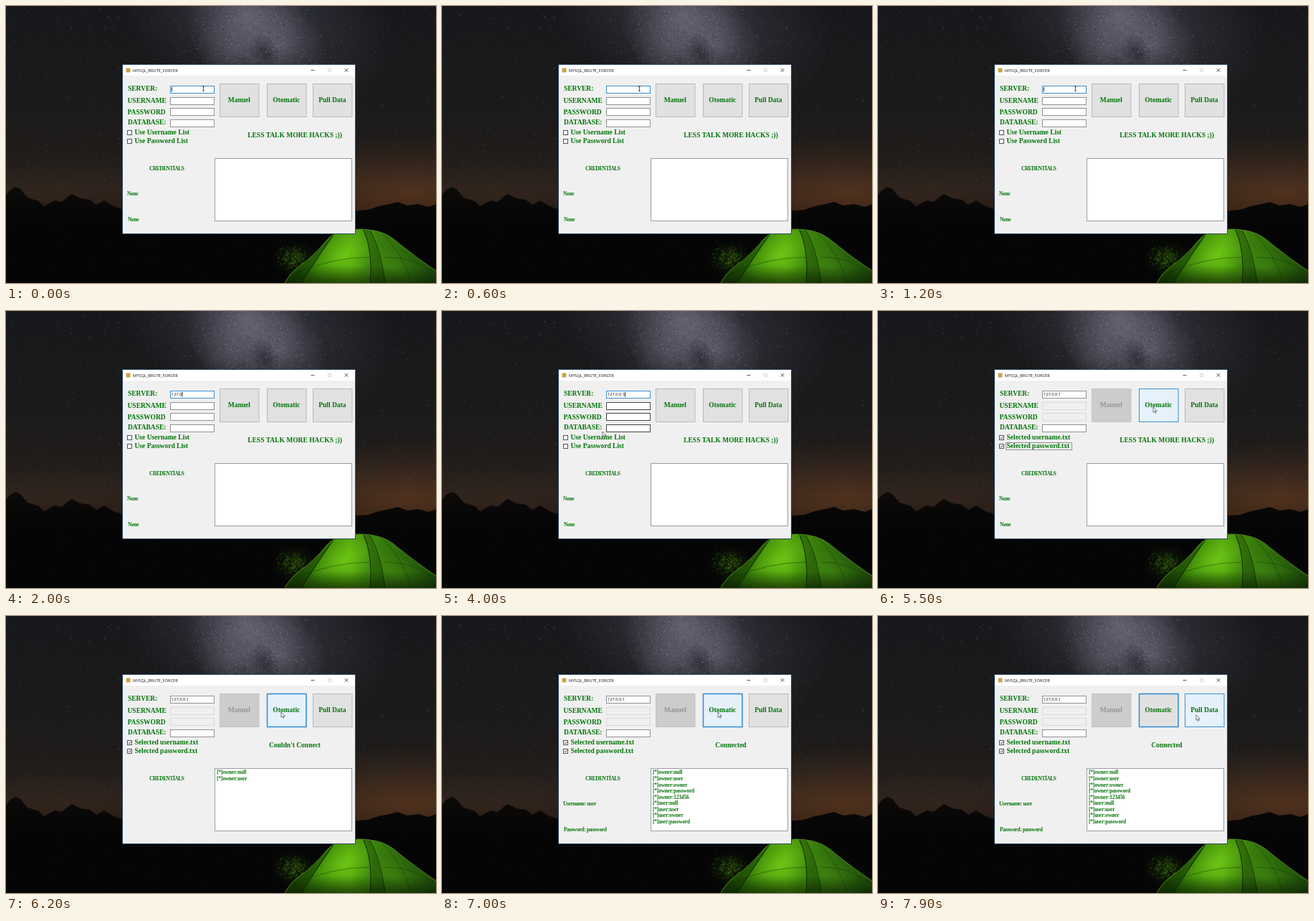
These frames come from a looping animation (600x386 px, 8000 ms). An HTML page with a canvas:

```html
<!DOCTYPE html>
<html lang="en">
<head>
<meta charset="utf-8">
<title>Login form</title>
<style>
html, body { margin: 0; width: 100%; height: 100%; overflow: hidden; background: #0c0d0f; }
canvas, svg { position: absolute; left: 0; top: 0; width: 600px; height: 386px; }
text { white-space: pre; }
.b { font: bold 9.5px "Liberation Serif", serif; fill: #05750a; }
.s, .l { font: bold 7.4px "Liberation Serif", serif; fill: #05750a; letter-spacing: -0.28px; }
.l { letter-spacing: -0.16px; }
.u { font: 5.7px "Open Sans", sans-serif; fill: #111; }
.m { text-anchor: middle; }
</style>
</head>
<body>
<canvas id="sky" width="600" height="386"></canvas>
<svg id="ui" viewBox="0 0 600 386"></svg>
<script>
const LOOP = 8000;

// ---------- night scene, painted once ----------
const c = document.getElementById('sky').getContext('2d');
let seed = 7;
const rnd = () => (seed = (seed * 16807) % 2147483647) / 2147483647;
const bell = () => rnd() + rnd() + rnd() - 1.5;

function fade(g, stops) {
  stops.forEach(([p, col]) => g.addColorStop(p, col));
  return g;
}
function glow(x, y, rx, ry, turn, rgb, a) {
  c.save();
  c.translate(x, y);
  c.rotate(turn);
  c.scale(rx, ry);
  c.fillStyle = fade(c.createRadialGradient(0, 0, 0, 0, 0, 1),
    [[0, `rgba(${rgb},${a})`], [0.5, `rgba(${rgb},${a * 0.45})`], [1, `rgba(${rgb},0)`]]);
  c.fillRect(-1, -1, 2, 2);
  c.restore();
}
function shape(d, fill, stroke, w) {
  const p = new Path2D(d);
  if (fill) { c.fillStyle = fill; c.fill(p); }
  if (stroke) { c.strokeStyle = stroke; c.lineWidth = w; c.stroke(p); }
}
function speck(x, y, size, col) {
  c.fillStyle = col;
  c.fillRect(x, y, size, size);
}

function paintScene() {
  c.fillStyle = fade(c.createLinearGradient(0, 0, 0, 290),
    [[0, '#17181b'], [0.4, '#1a1a1b'], [0.7, '#1f1c1a'], [0.88, '#2a211c'], [1, '#261a14']]);
  c.fillRect(0, 0, 600, 386);
  glow(565, 262, 250, 80, 0, '125,70,32', 0.45);
  glow(70, 262, 180, 45, 0, '75,50,36', 0.25);
  glow(350, 15, 200, 125, 0.3, '92,92,112', 0.5);
  glow(335, 15, 85, 85, -0.3, '150,147,168', 0.45);
  glow(385, 55, 65, 55, 0.5, '145,142,165', 0.35);
  glow(315, 60, 50, 50, 0, '130,127,148', 0.28);
  glow(361, 66, 20, 30, -0.5, '30,29,38', 0.6);

  for (let i = 0; i < 3000; i++) {
    const y = rnd() * 95, x = 338 + y * 0.25 + bell() * 100;
    speck(x, y, 0.6 + rnd() * 0.7, rnd() < 0.6 ? `rgba(205,205,225,${rnd() * 0.3})` : `rgba(18,18,27,${rnd() * 0.3})`);
  }
  for (let i = 0; i < 2600; i++)
    speck(rnd() * 600, rnd() * 245, 0.5 + rnd() * 0.6, `rgba(190,192,205,${rnd() * 0.28})`);
  for (let i = 0; i < 80; i++)
    speck(rnd() * 600, rnd() * 200, 1, `rgba(220,222,232,${0.15 + rnd() * 0.35})`);

  // ridges and ground
  shape('M0 263L6 256L13 252L20 255L30 267L46 272L53 279L68 271L78 273L86 266L92 262L104 268L117 270L126 277L137 271L150 279L170 286H480L505 284L520 279L535 276L547 273L560 278L575 276L590 280L600 276V386H0Z',
    fade(c.createLinearGradient(0, 255, 0, 300), [[0, '#0c0a09'], [1, '#050505']]));
  for (let i = 0; i < 300; i++)
    speck(rnd() * 600, 295 + rnd() * 90, 1.3, `rgba(30,29,22,${rnd() * 0.22})`);

  // bush beside the tent
  glow(402, 352, 32, 26, 0, '35,75,12', 0.4);
  for (let i = 0; i < 320; i++)
    speck(402 + bell() * 23, 351 + bell() * 18, 1 + rnd(), `rgba(${45 + rnd() * 45 | 0},${85 + rnd() * 55 | 0},20,${rnd() * 0.6})`);

  // tent
  const edge = 'M389 386Q397 371 410 362Q428 350 447 327Q455 317 470 313Q496 309 514 313Q527 315 540 324Q574 352 606 373';
  const body = edge + 'V386Z';
  c.save();
  c.clip(new Path2D(body));
  shape(body, fade(c.createLinearGradient(392, 0, 600, 0),
    [[0, '#1f4d05'], [0.2, '#388008'], [0.42, '#52a40c'], [0.6, '#3a800c'], [0.8, '#2c660c'], [1, '#1f4d0a']]));
  glow(472, 347, 52, 32, -0.5, '125,215,25', 0.65);
  glow(545, 368, 55, 26, 0.6, '80,155,25', 0.35);
  shape('M389 386Q403 367 440 335L459 316Q437 350 412 386Z', 'rgba(14,48,2,.45)');
  shape('M506 312Q520 335 529 386H508Q512 340 498 312Z', 'rgba(15,50,4,.35)');
  shape('M459 316Q434 350 412 386M507 312Q522 335 529 386M499 312Q512 340 508 386', null, 'rgba(15,48,3,.85)', 1.2);
  shape('M524 316Q552 342 566 386M402 373Q455 350 509 350M529 350Q565 349 600 373', null, 'rgba(18,55,6,.55)', 0.9);
  c.fillStyle = fade(c.createLinearGradient(0, 362, 0, 386), [[0, 'rgba(6,20,2,0)'], [1, 'rgba(6,20,2,.6)']]);
  c.fillRect(385, 362, 215, 24);
  c.restore();
  shape(edge, null, '#5f9c22', 0.8);
}
paintScene();

// ---------- window ----------
const ui = document.getElementById('ui');
function add(tag, attrs, text) {
  const e = document.createElementNS('http://www.w3.org/2000/svg', tag);
  set(e, attrs);
  if (text !== undefined) e.textContent = text;
  return ui.appendChild(e);
}
function set(e, attrs) {
  for (const k in attrs) e.setAttribute(k, attrs[k]);
}
const box = (x, y, width, height, fill, stroke = 'none') => add('rect', { x, y, width, height, fill, stroke });
const label = (x, y, cls, s) => add('text', { x, y, class: cls }, s);
const line = (d, stroke, w = 0.8) => add('path', { d, stroke, fill: 'none', 'stroke-width': w });
const show = (e, on) => e.setAttribute('visibility', on ? 'visible' : 'hidden');
const say = (e, s) => { if (e.textContent !== s) e.textContent = s; };

const BLUE = '#3a8fd4', GRAY = '#929292';

box(162.5, 81.5, 325, 236, '#f0f0f0', '#2b4a66');
box(163, 82, 324, 15, '#fff');
box(167.5, 86.5, 6, 6, '#c9a44a');
label(177, 91.8, 'u', 'MYSQL_BRUTE_FORCER');
line('M425.5 89.5H430.5', '#333');
line('M449.5 87.5H453.5V91.5H449.5Z', '#ccc');
line('M472.7 87.2L477.2 91.7M477.2 87.2L472.7 91.7', '#222');

[['SERVER:', 170, 118], ['USERNAME', 169.5, 135.3], ['PASSWORD', 169.5, 150.8], ['DATABASE:', 170, 165]]
  .forEach(([s, x, y]) => label(x, y, 'b', s));
const [server, userBox, passBox, dbBox] = [111.5, 127.5, 142.5, 158.5].map(y => box(229.5, y, 61, 10, '#fff', GRAY));
const typed = label(231, 118.4, 'u', '');
const caret = line('', '#000', 0.9);

const checks = [[173.5, 'username'], [185.5, 'password']].map(([y, word]) => ({
  word,
  frame: box(169.5, y, 6, 6, '#fff', '#555'),
  tick: line(`M170.8 ${y + 3.1}L172.2 ${y + 4.5}L174.6 ${y + 1.5}`, '#333', 0.9),
  text: label(179.5, y + 5.9, 'b', ''),
  focus: box(178.5, y - 2, 92, 10, 'none', GRAY)
}));

const [manual, auto, pull] = [[298, 'Manuel'], [364, 'Otomatic'], [428, 'Pull Data']].map(([x, s]) => ({
  rect: box(x + 0.5, 108.5, 54.5, 46, '#e1e1e1', '#b8b8b8'),
  text: label(x + 27.3, 134.3, 'b m', s)
}));
const status = label(403, 183, 'b m', '');

label(200, 229.4, 's', 'CREDENTİALS').style.letterSpacing = '-0.45px';
const cred1 = label(169, 263.5, 's', '');
const cred2 = label(170, 300.2, 's', '');
box(291.5, 212.5, 191, 87, '#fff', '#9a9da2');
const tries = ['owner:null', 'owner:user', 'owner:owner', 'owner:password', 'owner:123456',
  'user:null', 'user:user', 'user:owner', 'user:password'];
const rows = tries.map((s, i) => label(294, 220.4 + i * 8.55, 'l', '[*]' + s));

const beam = line('M274 112H277M275.5 112V118.3M274 118.3H277', '#222', 0.8);
const arrow = add('path', { d: 'M0 0V7.2L1.7 5.7L2.9 8.3L4 7.8L2.9 5.3H5.1Z', fill: '#fff', stroke: '#222', 'stroke-width': 0.6 });

// ---------- timeline ----------
const keys = [1500, 1600, 1700, 1900, 2000, 2800, 2900, 3000, 3300];
const path = [[3600, 275, 114], [4000, 224, 168], [4300, 213, 176], [4500, 213, 176], [4850, 226, 188],
  [5050, 226, 188], [5400, 384, 134], [6950, 384, 134], [7600, 444, 138]];
const PICK1 = 4400, PICK2 = 5000, RUN = 6000, DONE = 6900;

function pointer(t) {
  let i = path.findIndex(p => p[0] > t);
  if (i < 0) return path[path.length - 1].slice(1);
  if (i === 0) i = 1;
  const [t0, x0, y0] = path[i - 1], [t1, x1, y1] = path[i];
  const p = Math.max(0, (t - t0) / (t1 - t0)), e = p * p * (3 - 2 * p);
  return [x0 + (x1 - x0) * e, y0 + (y1 - y0) * e];
}

function field(e, off, lit) {
  set(e, { fill: off ? '#f0f0f0' : '#fff', stroke: off ? '#d8d8d8' : lit ? '#444' : GRAY });
}
function button(b, hover, focus, down) {
  set(b.rect, {
    fill: down ? '#cce4f7' : hover ? '#e5f1fb' : '#e1e1e1',
    stroke: hover || focus ? BLUE : '#b8b8b8',
    'stroke-width': focus ? 1.6 : 1
  });
}

function draw(t) {
  const [x, y] = pointer(t);
  const one = t >= PICK1, two = t >= PICK2, run = t >= RUN, done = t >= DONE;

  const n = keys.filter(k => k <= t).length;
  say(typed, '127.0.0.1'.slice(0, n));
  const blink = t >= keys[0] || Math.floor(t / 530) % 2 === 0;
  const cx = 231.3 + (n ? typed.getComputedTextLength() : 0);
  set(caret, { d: `M${cx} 113V119.5` });
  show(caret, !one && blink);
  server.setAttribute('stroke', one ? GRAY : BLUE);

  const swept = t >= 3800 && !one;
  field(userBox, one, swept);
  field(passBox, two, swept);
  field(dbBox, false, swept);

  checks.forEach((k, i) => {
    const on = i ? two : one, top = i ? 184 : 172;
    const hover = t >= 3700 && x > 168 && x < 272 && y >= top && y < top + 11;
    say(k.text, on ? `Selected ${k.word}.txt` : i ? 'Use Password List' : 'Use Username List');
    show(k.tick, on);
    show(k.focus, i ? two && !run : one && !two);
    k.frame.setAttribute('stroke', hover ? BLUE : '#555');
  });

  set(manual.rect, { fill: one ? '#cccccc' : '#e1e1e1', stroke: one ? '#c2c2c2' : '#b8b8b8' });
  manual.text.style.fill = one ? '#959595' : '';
  const inRow = t >= 3700 && y > 108 && y < 155;
  button(auto, inRow && x >= 364 && x < 419, run, run && t < RUN + 100);
  button(pull, inRow && x >= 428, false, false);

  say(status, done ? 'Connected' : run ? "Couldn't Connect" : 'LESS TALK MORE HACKS ;))');
  say(cred1, done ? 'Username: user' : run ? '' : 'None');
  say(cred2, done ? 'Password: password' : run ? '' : 'None');
  rows.forEach((r, i) => show(r, t >= RUN + 100 * (i + 1)));

  show(beam, t < keys[0]);
  show(arrow, t >= 3700);
  arrow.setAttribute('transform', `translate(${x.toFixed(2)} ${y.toFixed(2)})`);
}

const start = performance.now();
function tick() {
  draw((performance.now() - start) % LOOP);
  requestAnimationFrame(tick);
}
tick();
</script>
</body>
</html>
```
